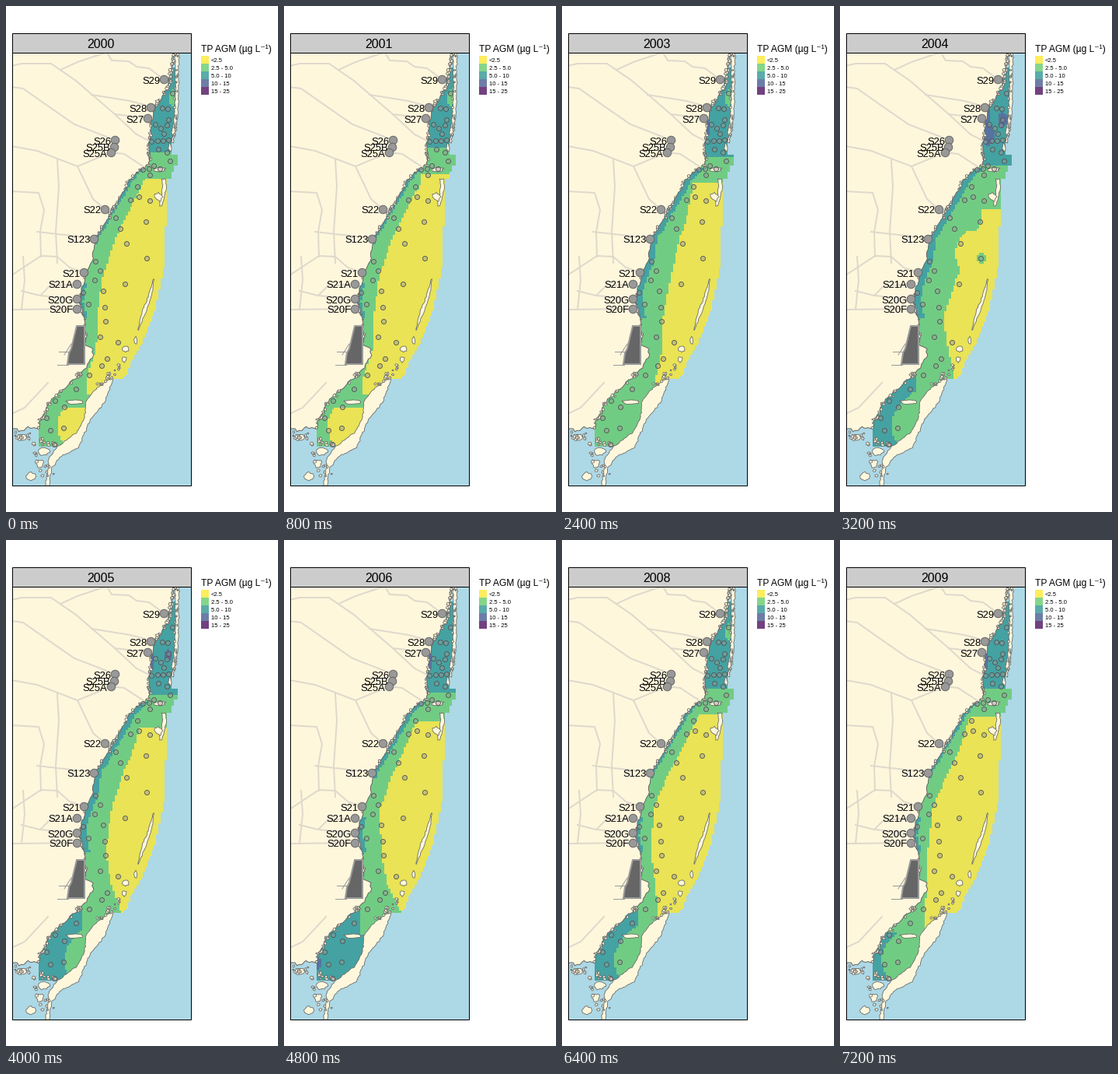
Recreate the animation shown at these times as a matplotlib script. Size 350x650 px, loop 8000 ms.

```python
import numpy as np
import matplotlib.pyplot as plt
from matplotlib.animation import FuncAnimation
from matplotlib.colors import to_rgb
from matplotlib.patches import Polygon, Rectangle

W, H, DPI = 350, 650, 100
PX = 72 / DPI
CELL = 2.8
LEFT, TOP, RIGHT, BOTTOM = 7.5, 59.5, 237.5, 615.5
WATER, LAND, SHORE, CANAL = "#add8e6", "#fff7dc", "#666666", "#dfd9cc"
PALETTE = np.array([to_rgb(c) for c in
                    ("#fde725", "#5dc863", "#21908c", "#3b528b", "#440154")])
YELLOW, GREEN, TEAL, BLUE = range(4)
ALPHA = 0.75

plt.rcParams["font.family"] = ["Liberation Sans", "DejaVu Sans"]
rng = np.random.default_rng(12)

fig = plt.figure(figsize=(W / DPI, H / DPI), dpi=DPI, facecolor="white")
ax = fig.add_axes([0, 0, 1, 1])
ax.axis("off")
frame = Rectangle((LEFT, TOP), RIGHT - LEFT, BOTTOM - TOP,
                  fc=WATER, ec="none", zorder=0)
ax.add_patch(frame)


def rough(points, amp, step=2.5):
    """Subdivide a line and shake it into a ragged shore."""
    out = []
    points = np.array(points, float)
    for a, b in zip(points[:-1], points[1:]):
        n = max(1, int(np.hypot(*(b - a)) / step))
        out += [a + (b - a) * k / n + rng.normal(0, amp, 2) for k in range(n)]
    return out + [points[-1]]


def land(points, lw=0.8, fc=LAND, ec=SHORE, z=3):
    shape = Polygon(points, closed=True, fc=fc, ec=ec, lw=lw * PX, zorder=z)
    ax.add_patch(shape)
    shape.set_clip_path(frame)


def ribbon(spine, amp=0.5):
    """Long island from (x, y, width) points."""
    x, y, w = np.array(spine, float).T
    sides = np.r_[np.c_[x - w / 2, y], np.c_[x + w / 2, y][::-1]]
    land(rough(np.r_[sides, sides[:1]], amp))


def blob(x, y, rx, ry):
    ang = np.linspace(0, 2 * np.pi, 12, endpoint=False)
    r = rng.uniform(0.65, 1.2, len(ang))
    land(np.c_[x + rx * r * np.cos(ang), y + ry * r * np.sin(ang)])


def islets(x, y, spread, size):
    for px, py in zip(x, y):
        dx, dy = rng.normal(0, spread, 2)
        blob(px + dx, py + dy, *(size * rng.uniform(0.5, 1.2, 2)))


def chain(x0, y0, x1, y1, count, spread, size):
    s = rng.uniform(0, 1, count)
    islets(x0 + (x1 - x0) * s, y0 + (y1 - y0) * s, spread, size)


# Mainland shore, north to south
COAST = [(213, 50), (216, 62), (212, 86), (207, 106), (193, 129), (187, 150),
         (184, 180), (185, 195), (183, 204), (166, 216), (158, 226), (147, 246),
         (136, 263), (122, 288), (115, 298), (111, 325), (101, 352), (97, 365),
         (95, 380), (101, 402), (103, 436), (112, 440), (113, 447), (103, 465),
         (84, 483), (61, 504), (53, 513), (49, 525), (43, 535), (42, 543)]
coast_x, coast_y = np.array(COAST, float).T


def shore(y):
    return np.interp(y, coast_y, coast_x)


land(rough(COAST + [(28, 541), (20, 546), (12, 543), (0, 547)], 0.75) + [(0, 50)], 1)

# Barrier islands and keys
ribbon([(220, 50, 5), (220, 105, 4), (219, 140, 5), (214, 175, 3)])
ribbon([(203, 222, 5), (204, 234, 5), (199, 257, 3)], 0.4)
ribbon([(190, 351, 1), (185, 373, 4), (178, 392, 5), (170, 416, 1)], 0.4)
ribbon([(137, 477, 2), (122, 495, 20), (115, 509, 24), (105, 530, 9),
        (96, 548, 10), (79, 567, 28), (62, 580, 14), (57, 593, 4), (53, 616, 5)])
for spec in [(196, 245, 5, 6), (211, 182, 2, 5), (198, 210, 8, 3), (167, 430, 2, 5),
             (154, 441, 4, 4), (152, 454, 3, 4), (89, 509, 13, 3), (49, 573, 7, 5),
             (32, 604, 6, 6), (20, 554, 9, 4), (44, 588, 5, 5)]:
    blob(*spec)
for y0, y1, count, spread, size in [(60, 130, 36, 1.3, 2), (135, 215, 22, 1.1, 1.7),
                                    (215, 300, 28, 1.4, 1.8), (315, 430, 10, 0.9, 1.2),
                                    (465, 543, 26, 1.3, 1.9)]:
    y = rng.uniform(y0, y1, count)
    islets(shore(y), y, spread, size)
chain(220, 62, 217, 170, 20, 0.9, 1.6)
chain(8, 548, 60, 566, 24, 3, 1.9)
chain(28, 566, 54, 600, 12, 4, 1.7)
chain(150, 459, 118, 490, 18, 2.2, 1.7)

# Canals
CANALS = [
    [(7, 77), (20, 74), (58, 74), (90, 96), (140, 139), (168, 165), (184, 173)],
    [(70, 82), (92, 72), (128, 60)],
    [(130, 60), (136, 70), (158, 71), (168, 78), (184, 80), (203, 94)],
    [(7, 104), (22, 106), (62, 134), (88, 152), (140, 172)],
    [(110, 114), (160, 122), (186, 129)],
    [(140, 139), (182, 144)],
    [(7, 180), (40, 186), (92, 206), (135, 188), (152, 190), (178, 207)],
    [(66, 198), (68, 232), (64, 290), (66, 330)],
    [(92, 206), (112, 248), (127, 261)],
    [(7, 238), (42, 240), (49, 262), (44, 290), (45, 322)],
    [(40, 290), (66, 293), (113, 298)],
    [(7, 346), (45, 321), (66, 322), (82, 336), (100, 342)],
    [(22, 322), (24, 352), (20, 390)],
    [(20, 366), (44, 372), (56, 360), (91, 357)],
    [(44, 372), (91, 376)],
    [(7, 390), (91, 389)],
    [(7, 524), (24, 516), (54, 484)],
]


def line(points, color=CANAL, lw=2):
    ax.plot(*zip(*points), color=color, lw=lw * PX, zorder=4,
            solid_joinstyle="round")[0].set_clip_path(frame)


for pts in CANALS:
    line(pts)

# Cooling ponds
for pts in ([(68, 444), (84, 444)], [(66, 461), (80, 461)], [(75, 448), (84, 434)]):
    line(pts, "#999999", 1)
land([(91, 411), (101, 411), (101, 460), (79, 460), (81, 446), (84, 440)],
     2, SHORE, "#999999", 5)

# Seaward limit of the grid, as (y, x)
EAST = [(78, 219), (130, 219), (160, 215), (192, 213), (192, 221), (206, 221),
        (206, 215), (212, 215), (212, 212), (222, 212), (222, 207), (262, 207),
        (335, 203), (388, 193), (432, 176), (461, 159), (472, 156), (478, 150),
        (478, 139), (499, 112), (505, 103), (540, 102), (552, 95), (564, 78)]

# Yellow edge of the first year, and each year's shift at chosen heights
EDGE_Y = [225, 250, 275, 300, 345, 400, 440, 478]
EDGE_X = [178, 165, 152, 140, 125, 117, 116, 104]
SHIFT_Y = [225, 275, 345, 400, 440, 478]
SHIFTS = [
    (0, 0, 0, 0, 0, 0),
    (-1, -1, -2, -2, -2, -2),
    (-1, 1, 0, 2, -1, -1),
    (-8, 8, 16, 13, 13, 17),
    (6, 31, 27, 16, 23, 43),
    (-1, 10, 11, 11, 19, 44),
    (-4, 0, -1, 8, 16, 46),
    (0, -2, -8, -2, 11, 34),
    (-2, -1, -7, -3, 4, 20),
    (-10, 0, -6, -4, -3, 4),
]

# North limit, teal strip width, yellow top and bottom, southern teal and yellow
NONE = -99
ZONES = [
    (188, 4, 221, 498, NONE, 66),
    (182, 4, 217, 500, NONE, 56),
    (178, 5, 212, 498, NONE, 69),
    (194, 8, 226, 487, NONE, NONE),
    (206, 9, 260, 478, 66, NONE),
    (200, 8, 240, 478, 75, NONE),
    (197, 6, 232, 477, 150, NONE),
    (188, 4, 221, 478, 87, NONE),
    (190, 4, 223, 488, 67, NONE),
    (192, 4, 226, 498, 54, NONE),
]

# Ellipses: class, centre, radii
TIP = (GREEN, 214.5, 119, 4, 11)
WEST = (BLUE, 187, 155, 3.5, 13)
SPOTS = [
    [TIP], [TIP],
    [(GREEN, 214, 113, 6, 19), (GREEN, 189, 172, 6, 7)],
    [TIP, WEST],
    [(YELLOW, 172, 318, 23, 30), (GREEN, 182, 324, 5, 7), (BLUE, 188, 140, 6, 12),
     (BLUE, 191, 165, 7, 14), (BLUE, 209, 146, 6, 10)],
    [WEST, (BLUE, 209, 148, 4, 7)],
    [WEST, (BLUE, 211, 88, 3, 9), (BLUE, 44, 543, 3, 8)],
    [TIP], [TIP], [WEST],
]

gx, gy = np.meshgrid(np.arange(42, 224, CELL) + CELL / 2,
                     np.arange(76, 564, CELL) + CELL / 2)
inside = ((gx < np.interp(gy, *zip(*EAST))) & (gy > 78)
          & (gx > np.maximum(shore(gy) - 4, 42)))


def zones(i):
    north, width, top, bottom, teal_x, yellow_x = ZONES[i]
    edge = np.interp(gy, EDGE_Y, EDGE_X) + np.interp(gy, SHIFT_Y, SHIFTS[i])
    bend = 0.015 * (gy - 540) ** 2
    z = np.full(gx.shape, GREEN)
    z[(gx > edge) & (gy > top) & (gy < bottom)] = YELLOW
    if yellow_x != NONE:
        z[(gx > yellow_x + bend) & (gy > 515)] = YELLOW
    strip = (gx < shore(gy) + width) & (gy > 208) & (gy < 402)
    if width < 7:
        strip &= (gy < 305) | (gy > 355)
    z[strip | (gy < north)] = TEAL
    if teal_x != NONE:
        start = 503 if teal_x < 60 else 474
        cap = np.where(gy < 506, 97, 999)
        z[(gx < np.minimum(teal_x + bend, cap)) & (gy > start)] = TEAL
    for kind, x, y, rx, ry in SPOTS[i]:
        z[((gx - x) / rx) ** 2 + ((gy - y) / ry) ** 2 < 1] = kind
    rgb = PALETTE[z] * ALPHA + np.array(to_rgb(WATER)) * (1 - ALPHA)
    return np.dstack([rgb, inside])


half = CELL / 2
raster = ax.imshow(zones(0), interpolation="nearest", aspect="auto", zorder=1,
                   extent=(gx.min() - half, gx.max() + half,
                           gy.max() + half, gy.min() - half))

# Sampling sites
NORTH_SITES = [(214, 112), (201, 131), (208, 132), (209, 146), (192, 152), (199, 157),
               (207, 153), (203, 164), (187, 174), (195, 173), (202, 173), (209, 172),
               (196, 184), (207, 188), (211, 199), (190, 205), (176, 210), (184, 209),
               (185, 217), (198, 209)]
SOUTH_SITES = [(169, 232), (171, 245), (160, 249), (185, 250), (141, 272), (180, 277),
               (147, 286), (155, 305), (115, 328), (181, 324), (121, 340), (114, 352),
               (153, 357), (99, 368), (125, 366), (106, 383), (127, 387), (128, 405),
               (121, 425), (144, 432), (130, 453), (123, 462), (107, 474), (90, 492),
               (63, 507), (75, 515), (52, 529), (57, 545), (74, 542), (62, 563)]
for sites in (NORTH_SITES, SOUTH_SITES):
    ax.plot(*zip(*sites), "o", ms=6 * PX, mfc=(0.6, 0.6, 0.6, 0.45),
            mec="#555555", mew=0.9 * PX, zorder=6)

STATIONS = {"S29": (203, 94), "S28": (186, 130), "S27": (182, 144), "S26": (140, 172),
            "S25B": (139, 181), "S25A": (135, 188), "S22": (127, 261), "S123": (113, 299),
            "S21": (100, 342), "S21A": (91, 357), "S20G": (91, 376), "S20F": (91, 389)}
ax.plot(*zip(*STATIONS.values()), "o", ms=10.5 * PX, mfc="#999999", mec="#666666",
        mew=PX, zorder=7)


def label(x, y, text, size, ha="left"):
    return ax.text(x, y, text, fontsize=size * PX, ha=ha, va="baseline", zorder=9)


for name, (x, y) in STATIONS.items():
    label(x - 4.5, y + 5.5, name, 13, "right")

# Frame, title strip and legend
for y, h, fc in ((34.5, 25, "#cccccc"), (TOP, BOTTOM - TOP, "none")):
    ax.add_patch(Rectangle((LEFT, y), RIGHT - LEFT, h, fc=fc, ec="black",
                           lw=PX, zorder=8))
title = label(122, 54, "2000", 16, "center")
label(251, 59, "TP AGM (µg L⁻¹)", 12)
for k, text in enumerate(["<2.5", "2.5 - 5.0", "5.0 - 10", "10 - 15", "15 - 25"]):
    ax.add_patch(Rectangle((251, 64 + 10 * k), 10, 10, lw=0,
                           fc=PALETTE[k] * ALPHA + 1 - ALPHA))
    label(263.5, 72.5 + 10 * k, text, 7.7)

ax.set_xlim(0, W)
ax.set_ylim(H, 0)


def update(i):
    raster.set_data(zones(i))
    title.set_text(str(2000 + i))
    return raster, title


anim = FuncAnimation(fig, update, frames=len(ZONES), interval=800,
                     repeat=True, repeat_delay=0, blit=False)
plt.show()
```
